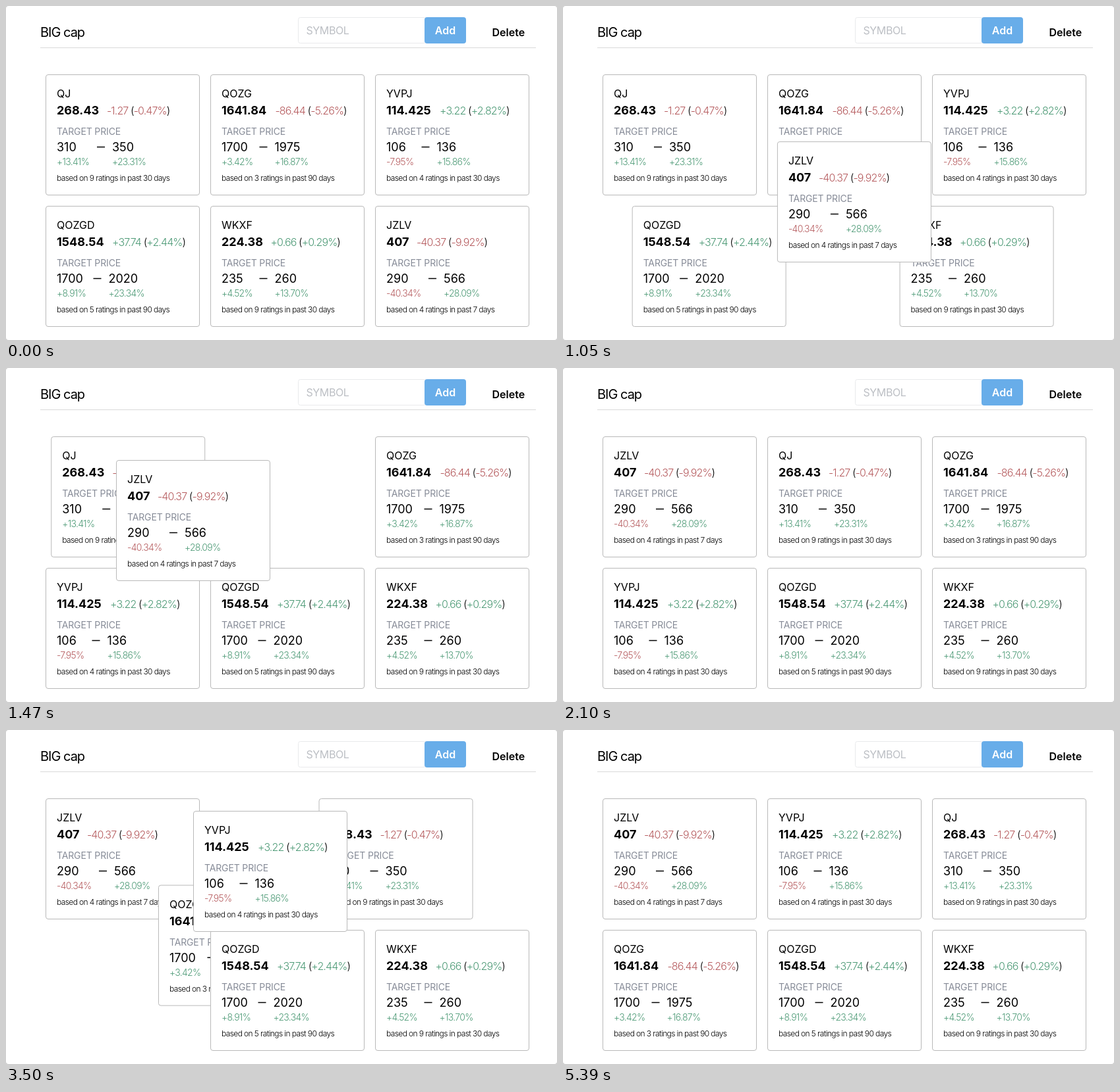
An HTML page for the animation above (5.53 s loop, 836 by 508 pixels).

```html
<!DOCTYPE html>
<html lang="en">
<head>
<meta charset="utf-8">
<title>Watchlist</title>
<style>
  html, body { margin: 0; width: 100%; height: 100%; overflow: hidden; background: #c8c8c8; }
  svg { display: block; width: 836px; height: 508px; }
  text { font-family: Inter, "Liberation Sans", sans-serif; font-size: 16px; fill: #000; white-space: pre; }
  .title { font-size: 20px; letter-spacing: -.05em; }
  .hint { fill: #bcbfc4; letter-spacing: -.025em; }
  .bold { font-weight: 600; }
  .price { font-size: 18px; font-weight: 700; }
  .change { font-weight: 300; letter-spacing: -.055em; }
  .label { font-size: 14px; fill: #868b97; letter-spacing: -.01em; }
  .target { font-size: 18px; }
  .pct { font-size: 14px; font-weight: 300; letter-spacing: -.05em; }
  .note { font-size: 12px; font-weight: 300; letter-spacing: -.05em; }
  .up { fill: #4d9a76; }
  .down { fill: #b65c5f; }
  .box { fill: #fff; stroke: #b9b9b9; }
</style>
</head>
<body>
<svg viewBox="0 0 836 508">
  <rect width="836" height="508" rx="4" fill="#fff"/>
  <text class="title" x="52" y="47">BIG cap</text>
  <rect x="443.5" y="17.5" width="194" height="39" rx="3" fill="#fff" stroke="#e9eaec"/>
  <text class="hint" x="455.5" y="43">SYMBOL</text>
  <rect x="635" y="17" width="63" height="40" rx="4" fill="#68ade9"/>
  <text class="bold" x="666.5" y="43" text-anchor="middle" style="fill:#fff">Add</text>
  <text class="bold" x="737.5" y="46">Delete</text>
  <path d="M52 63.5H804" stroke="#d9d9d9"/>
  <g id="cards"></g>
</svg>
<script>
const LOOP = 5530, STEP = 70, SHIFT = 300;
const layer = document.getElementById('cards');

// ticker, price, change, change %, change x, low, high, low %, high %, high x, ratings, days
const stocks = [
  ['QJ', '268.43', '-1.27', '-0.47%', 76, '310', '350', '+13.41%', '+23.31%', 84, 9, 30],
  ['QOZG', '1641.84', '-86.44', '-5.26%', 81.5, '1700', '1975', '+3.42%', '+16.87%', 80.5, 3, 90],
  ['YVPJ', '114.425', '+3.22', '+2.82%', 81, '106', '136', '-7.95%', '+15.86%', 76.5, 4, 30],
  ['QOZGD', '1548.54', '+37.74', '+2.44%', 84, '1700', '2020', '+8.91%', '+23.34%', 78.5, 5, 90],
  ['WKXF', '224.38', '+0.66', '+0.29%', 74.5, '235', '260', '+4.52%', '+13.70%', 80.5, 9, 30],
  ['JZLV', '407', '-40.37', '-9.92%', 46, '290', '566', '-40.34%', '+28.09%', 87, 4, 7]
];

// card, start time, slot before, slot after
const shifts = [
  [4, 900, 4, 5], [3, 1006, 3, 4], [1, 1057, 1, 2], [2, 1057, 2, 3], [0, 1455, 0, 1],
  [0, 3385, 1, 2], [1, 3385, 2, 3]
];

// time, x, y of the card held by the pointer
const drags = [
  { card: 5, path: [[640, 560, 304], [840, 442, 265], [1190, 256, 171], [1470, 167, 140], [1750, 115, 133], [1890, 60, 104]] },
  { card: 2, path: [[3150, 60, 304], [3220, 78, 282], [3390, 200, 185], [3500, 284, 123], [3700, 310, 104]] }
];

const tone = s => s[0] === '+' ? 'up' : 'down';
const txt = (cls, x, y, s) => `<text class="${cls}" x="${x}" y="${y}">${s}</text>`;

function makeCard([name, price, diff, diffPct, diffX, low, high, lowPct, highPct, highX, count, days]) {
  const g = document.createElementNS('http://www.w3.org/2000/svg', 'g');
  const span = s => `<tspan class="${tone(s)}">${s}</tspan>`;
  const right = 17 + highX;
  g.innerHTML = '<rect class="box" x=".5" y=".5" width="233" height="183" rx="3.5"/>' +
    txt('name', 17, 35, name) +
    txt('price', 17, 61, price) +
    txt('change', 17 + diffX, 61, `${span(diff)} (${span(diffPct)})`) +
    txt('label', 17, 92, 'TARGET PRICE') +
    txt('target', 17, 117, low) +
    `<path d="M${right - 23} 110.5h12" stroke="#000" stroke-width="1.5"/>` +
    txt('target', right, 117, high) +
    txt('pct ' + tone(lowPct), 17, 138, lowPct) +
    txt('pct ' + tone(highPct), right, 138, highPct) +
    txt('note', 17, 162, `based on ${count} ratings in past ${days} days`);
  layer.append(g);
  return g;
}

const cards = stocks.map(makeCard);
const slot = i => [60 + 250 * (i % 3), 104 + 200 * Math.floor(i / 3)];
const mix = (a, b, k) => a.map((v, i) => v + (b[i] - v) * k);

// CSS "ease": cubic-bezier(.25, .1, .25, 1)
function ease(p) {
  if (p <= 0) return 0;
  if (p >= 1) return 1;
  const curve = (u, a, b) => 3 * u * (1 - u) * ((1 - u) * a + u * b) + u ** 3;
  let lo = 0, hi = 1;
  for (let i = 0; i < 24; i++) {
    const mid = (lo + hi) / 2;
    if (curve(mid, .25, .25) < p) lo = mid; else hi = mid;
  }
  return curve(lo, .1, 1);
}

// Smooth curve through timed points
function along(path, t) {
  const last = path.length - 1;
  if (t >= path[last][0]) return path[last].slice(1);
  const i = path.findIndex(p => p[0] > t) - 1;
  const a = path[i], b = path[i + 1], dt = b[0] - a[0], u = (t - a[0]) / dt;
  const slope = (j, c) => {
    const p = path[Math.max(j - 1, 0)], q = path[Math.min(j + 1, last)];
    return j === last ? 0 : (q[c] - p[c]) / (q[0] - p[0]);
  };
  return [1, 2].map(c =>
    (2 * u ** 3 - 3 * u * u + 1) * a[c] + (3 * u * u - 2 * u ** 3) * b[c] +
    dt * (u * (1 - u) ** 2 * slope(i, c) - u * u * (1 - u) * slope(i + 1, c)));
}

function place(id, t) {
  let pos = slot(id);
  for (const [card, start, from, to] of shifts)
    if (card === id && t >= start) pos = mix(slot(from), slot(to), ease((t - start) / SHIFT));
  for (const { card, path } of drags)
    if (card === id && t >= path[0][0]) pos = along(path, t);
  return pos;
}

let stack = '';
function draw(t) {
  const order = t < 2000 ? [0, 1, 2, 3, 4, 5] : [5, 0, 1, 3, 4, 2];
  if (stack !== order.join()) {
    stack = order.join();
    layer.append(...order.map(i => cards[i]));
  }
  cards.forEach((g, i) => g.setAttribute('transform', `translate(${place(i, t).map(v => v.toFixed(2))})`));
}

const begin = performance.now();
function tick() {
  const t = (performance.now() - begin) % LOOP;
  draw(Math.floor(t / STEP) * STEP);
  requestAnimationFrame(tick);
}
tick();
</script>
</body>
</html>
```
